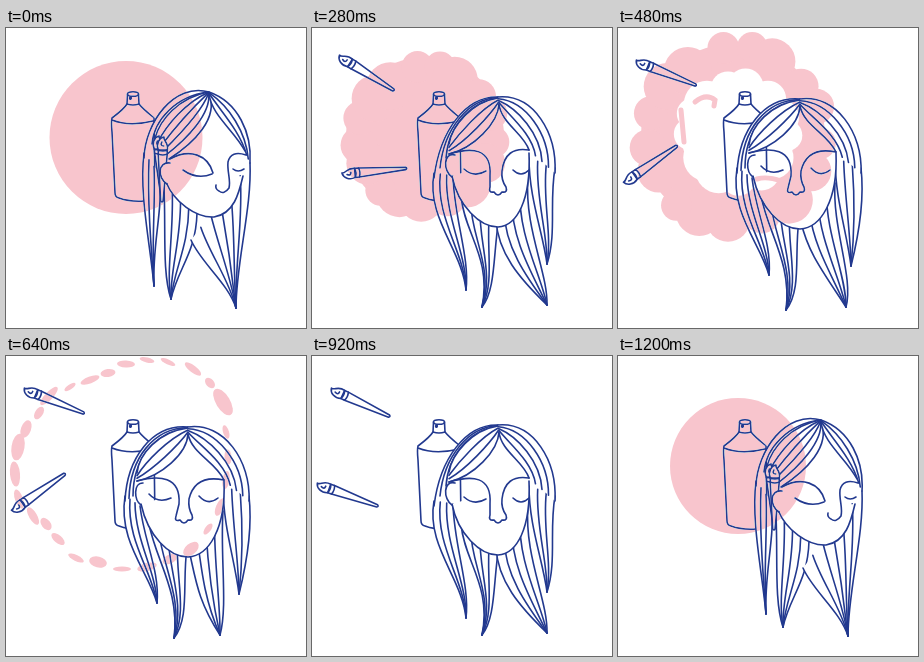
Animation of 300 by 300 pixels, one loop 1.24 s. Source, as an HTML page:

```html
<!DOCTYPE html>
<html lang="en">
<head>
<meta charset="utf-8">
<title>Hair colour</title>
<style>
  html, body { margin: 0; width: 100%; height: 100%; overflow: hidden; background: #fff; }
  svg { display: block; width: 100vw; height: 100vh; }
  .ink { fill: none; stroke: #22398f; stroke-width: 1.6; stroke-linecap: round; stroke-linejoin: round; }
  .solid { fill: #fff; }
  .blank { fill: #fff; stroke: none; }
  #pink { mix-blend-mode: darken; fill: #f8c5cd; }
  .streak { fill: none; stroke: #f8c5cd; stroke-linecap: round; }
</style>
</head>
<body>
<svg viewBox="0 0 300 300">
  <defs><mask id="hollow" maskUnits="userSpaceOnUse" x="0" y="0" width="300" height="300">
    <rect width="300" height="300" fill="#fff"/><g id="hole" fill="#000"></g>
  </mask></defs>
  <rect width="300" height="300" fill="#fff"/>
  <g class="ink">
    <path d="M106 90 Q105 94 106 104 L109 165 Q109 169 113 170 Q124 174 138 173 M148 90 L149 165 M121 76 Q118 81 106 90 M133 76 Q137 81 147 89 M106 92 Q123 99 147 93"/>
    <path d="M121.500 66 L121 76 Q127 78 133 76 L132.500 66"/>
    <ellipse cx="127" cy="66" rx="5.500" ry="2.300"/>
    <path d="M124 69 Q126 69 125 71 Q123 72 124 69"/>
  </g>
  <g id="hair" class="ink"></g>
  <g id="brushes" class="ink"></g>
  <g id="face" class="ink"></g>
  <g id="pink"></g>
</svg>
<script>
const LOOP = 1240, STEP = 40;
const $ = id => document.getElementById(id);
const line = (d, cls = '') => `<path class="${cls}" d="${d}"/>`;
const curve = c => `M${c[0]} ${c[1]}C${c.slice(2).join(' ')}`;
const dot = (x, y, r) => `<circle cx="${x}" cy="${y}" r="${Math.max(0, r)}"/>`;

// A lock is a fan of n + 1 strands blended between two cubic edges.
function lock(a, b, n) {
  const back = [b[6], b[7], b[4], b[5], b[2], b[3], b[0], b[1]];
  let out = line(`${curve(a)}L${back[0]} ${back[1]}C${back.slice(2).join(' ')}Z`, 'blank');
  for (let i = 0; i <= n; i++) out += line(curve(a.map((v, k) => +(v + (b[k] - v) * i / n).toFixed(1))));
  return out;
}
const locks = list => list.map(l => lock(...l)).join('');

const turned = {
  low: locks([
    [[138, 125, 133, 165, 144, 215, 148, 258], [153, 145, 158, 180, 146, 215, 148, 258], 3],
    [[158, 160, 160, 200, 156, 245, 165, 271], [191, 185, 190, 225, 172, 240, 165, 271], 4],
    [[185, 212, 195, 235, 222, 255, 230, 280], [244, 135, 246, 180, 230, 235, 230, 280], 6]]),
  top: locks([
    [[203, 64, 168, 54, 139, 95, 138, 130], [202, 64, 170, 68, 148, 92, 146, 116], 1],
    [[202, 64, 172, 70, 154, 92, 149, 110], [203, 66, 213, 90, 188, 115, 163, 131], 5],
    [[203, 64, 232, 74, 246, 105, 244, 135], [203, 66, 206, 88, 228, 102, 239, 123], 3]]),
  jaw: 'M160 154 C168 174 190 190 208 189 C228 186 233 165 237 148',
  ear: 'M164 135 C152 133 151 150 161 156',
  lines: 'M164 131 C184 120 202 127 207 145 M177 142 Q191 152 206 146 M240 127 Q225 122 222 134 C221 144 225 152 223 160 Q218 167 213 163 Q209 161 210 157 M227 141 Q232 145 238 141'
};
const frontal = {
  low: locks([
    [[122, 145, 114, 190, 150, 222, 154, 262], [141, 148, 142, 190, 158, 230, 154, 262], 3],
    [[149, 168, 152, 205, 180, 230, 170, 279], [187, 190, 181, 225, 184, 262, 170, 279], 4],
    [[184, 192, 186, 225, 207, 250, 235, 277], [216, 150, 212, 200, 236, 245, 235, 277], 4],
    [[217, 130, 217, 170, 231, 205, 235, 236], [243, 140, 237, 175, 245, 205, 235, 236], 3]]),
  top: locks([
    [[186, 69, 154, 68, 128, 102, 122, 150], [186, 70, 157, 74, 136, 100, 134, 130], 2],
    [[186, 70, 160, 74, 140, 98, 137, 116], [187, 76, 186, 95, 162, 120, 137, 126], 3],
    [[186, 69, 222, 66, 245, 105, 243, 145], [187, 76, 189, 95, 212, 106, 217, 122], 4]]),
  jaw: 'M140 148 C146 178 168 199 186 199 C205 198 219 172 217 125',
  ear: 'M143 127 C131 124 131 143 140 149',
  lines: 'M137 126 C160 119 180 120 178 148 L178 159 Q176 165 182 164 Q186 170 190 164 Q196 165 194 159 Q189 152 190 143 Q193 118 217 122 M152 141 Q162 150 174 143 M201 142 Q209 150 217 142'
};
// The tilted head lets its right lock swing to a given tip.
const tilted = tip => ({
  low: locks([
    [[119, 140, 112, 185, 142, 215, 151, 247], [134, 150, 138, 185, 154, 215, 151, 247], 3],
    [[143, 168, 150, 205, 174, 235, 168, 282], [181, 192, 176, 225, 184, 262, 168, 282], 4],
    [[183, 194, 190, 225, tip - 22, 245, tip, 279], [217, 155, 214, 200, tip + 8, 250, tip, 279], 4],
    [[217, 130, 217, 170, 229, 205, 233, 238], [243, 140, 247, 175, 240, 210, 233, 238], 3]]),
  top: locks([
    [[182, 71, 146, 68, 121, 102, 119, 145], [182, 72, 148, 76, 127, 104, 127, 140], 2],
    [[182, 72, 152, 76, 133, 98, 131, 117], [182, 78, 181, 98, 155, 120, 131, 125], 3],
    [[182, 71, 218, 66, 245, 105, 243, 145], [182, 78, 186, 98, 210, 106, 218, 124], 4]]),
  jaw: 'M135 148 C142 180 163 201 182 201 C203 200 220 172 218 125',
  ear: 'M137 127 C127 127 128 144 135 149',
  lines: 'M131 125 C153 119 175 120 173 148 L170 160 Q168 166 174 164 Q178 170 182 164 Q188 165 186 159 Q182 152 183 143 Q189 118 218 124 M143 138 Q152 148 165 142 M193 140 Q202 150 212 142'
});
const swungRight = tilted(228), swungLeft = tilted(214);

function headAt(t) {
  if (t < 200 || t >= 1000) return turned;
  if (t < 400 || t >= 800) return frontal;
  return t < 560 ? swungRight : swungLeft;
}

// Blend rows of [time, ...values].
function track(keys, t) {
  const i = keys.findIndex(k => k[0] > t);
  if (i < 0) return keys[keys.length - 1].slice(1);
  if (i === 0) return keys[0].slice(1);
  const a = keys[i - 1], b = keys[i], p = (t - a[0]) / (b[0] - a[0]);
  return a.slice(1).map((v, k) => v + (b[k + 1] - v) * p);
}

const brushArt =
  line('M0 -1 C4 0 5 -6 13 -4.500 L13 4.500 C7 7 1 4 0 -1Z', 'solid') +
  line('M5 1 Q9 3 9 -1') +
  line('M17 -4.500 L64 -1.200 Q66 0 64 1.200 L17 4.500Z', 'solid') +
  line('M13 -4.500 Q15 0 13 4.500 L17 4.500 Q19 0 17 -4.500Z', 'solid');
const upper = [[120, 152, 108, 86], [240, 27, 28, 32], [360, 27, 28, 32], [400, 18, 33, 22],
  [760, 18, 33, 22], [800, 19, 33, 25], [960, 19, 33, 25], [1120, 140, 116, 73], [1160, 152, 108, 86]];
const lower = [[120, 157, 109, 91], [240, 30, 146, -5], [360, 30, 146, -5], [400, 6, 155, -35],
  [760, 6, 155, -35], [800, 5, 128, 20], [960, 5, 128, 20], [1120, 147, 114, 81], [1160, 157, 109, 91]];
function brush(keys, t) {
  const [x, y, a] = track(keys, t);
  return `<g transform="translate(${x} ${y}) rotate(${a})">${brushArt}</g>`;
}

const noise = i => { const v = Math.sin(i * 78.233 + 4.1) * 43758.5453; return v - Math.floor(v); };

function cloud(x, y, r, lump, count, seed) {
  let out = dot(x, y, r - lump);
  if (lump <= 0) return out;
  for (let i = 0; i < count; i++) {
    const a = (i + noise(i + seed) * 0.5) / count * Math.PI * 2;
    const s = Math.min(r * 0.4, 15 + 9 * noise(i + seed + 40));
    const d = r - s + (noise(i + seed + 80) - 0.6) * lump * 0.6;
    out += dot(x + Math.cos(a) * d, y + Math.sin(a) * d, s);
  }
  return out;
}

// Leftover flecks: x, y, length, thickness.
const flecks = [
  [217, 46, 30, 14], [204, 27, 12, 8], [187, 13, 20, 7], [162, 6, 16, 5], [141, 4, 15, 5], [120, 8, 18, 7],
  [102, 17, 15, 8], [84, 24, 20, 7], [64, 31, 13, 5], [43, 40, 24, 8], [33, 57, 14, 8], [20, 73, 18, 10],
  [12, 91, 27, 13], [9, 118, 25, 10], [13, 143, 20, 8], [27, 160, 20, 8], [40, 168, 14, 9], [52, 183, 16, 8],
  [70, 202, 17, 6], [92, 206, 18, 11], [116, 213, 18, 5], [141, 211, 20, 8], [164, 203, 16, 9], [185, 193, 18, 11],
  [202, 173, 13, 6], [214, 151, 19, 8], [220, 124, 18, 7], [222, 101, 15, 7], [220, 76, 14, 6]];

function fleck([x, y, len, thick], k) {
  const a = Math.atan2(y - 108, x - 115) * 180 / Math.PI + 90;
  return `<ellipse rx="${len / 2 * k}" ry="${thick / 2 * k}" transform="translate(${x} ${y}) rotate(${a})"/>`;
}

const discKeys = [[1080, 118, 107, 0], [1120, 118, 107, 17], [1160, 119, 109, 45], [1200, 120, 110, 68]];
const cloudKeys = [[80, 120, 109.5, 76.5, 0], [280, 113, 108, 86, 7], [480, 115, 108, 106, 14], [600, 115, 109, 110, 14]];
const holeKeys = [[320, 0], [360, 14], [400, 30], [480, 65], [520, 80], [560, 94], [600, 103]];
const fleckKeys = [[600, 1.25], [640, 1], [680, 0.78], [720, 0.55], [760, 0.33], [800, 0.15], [840, 0]];

function drawPink(t) {
  let out = '', hole = '';
  if (t > 1080) out = dot(...track(discKeys, t));
  else if (t < 600) {
    const [x, y, r, lump] = track(cloudKeys, t);
    const [h] = track(holeKeys, t);
    if (h > 0) hole = cloud(x + 5, y - 3, h, Math.min(8, h / 5), 13, 7);
    out = `<g mask="url(#hollow)">${cloud(x, y, r, lump, 17, 1)}</g>`;
    if (t >= 440 && t < 560) {
      out += `<g stroke-width="${track([[440, 8], [480, 5], [560, 1]], t)[0]}">` +
        line('M77 74 Q88 65 97 72 L96 78 M63 82 L66 114 M139 151 Q149 148 163 153', 'streak') + '</g>';
    }
  } else if (t < 840) {
    const [k] = track(fleckKeys, t);
    out = flecks.map(f => fleck(f, k)).join('');
  }
  $('hole').innerHTML = hole;
  $('pink').innerHTML = out;
}

function draw(t) {
  const head = headAt(t);
  $('hair').innerHTML = head.low + line(head.jaw, 'solid') + head.top;
  $('brushes').innerHTML = brush(upper, t) + brush(lower, t);
  $('face').innerHTML = line(head.ear, 'solid') + line(head.lines);
  drawPink(t);
}

const start = performance.now();
let shown = -1;
function tick() {
  const t = Math.floor((performance.now() - start) % LOOP / STEP) * STEP;
  if (t !== shown) draw(shown = t);
  requestAnimationFrame(tick);
}
tick();
</script>
</body>
</html>
```
